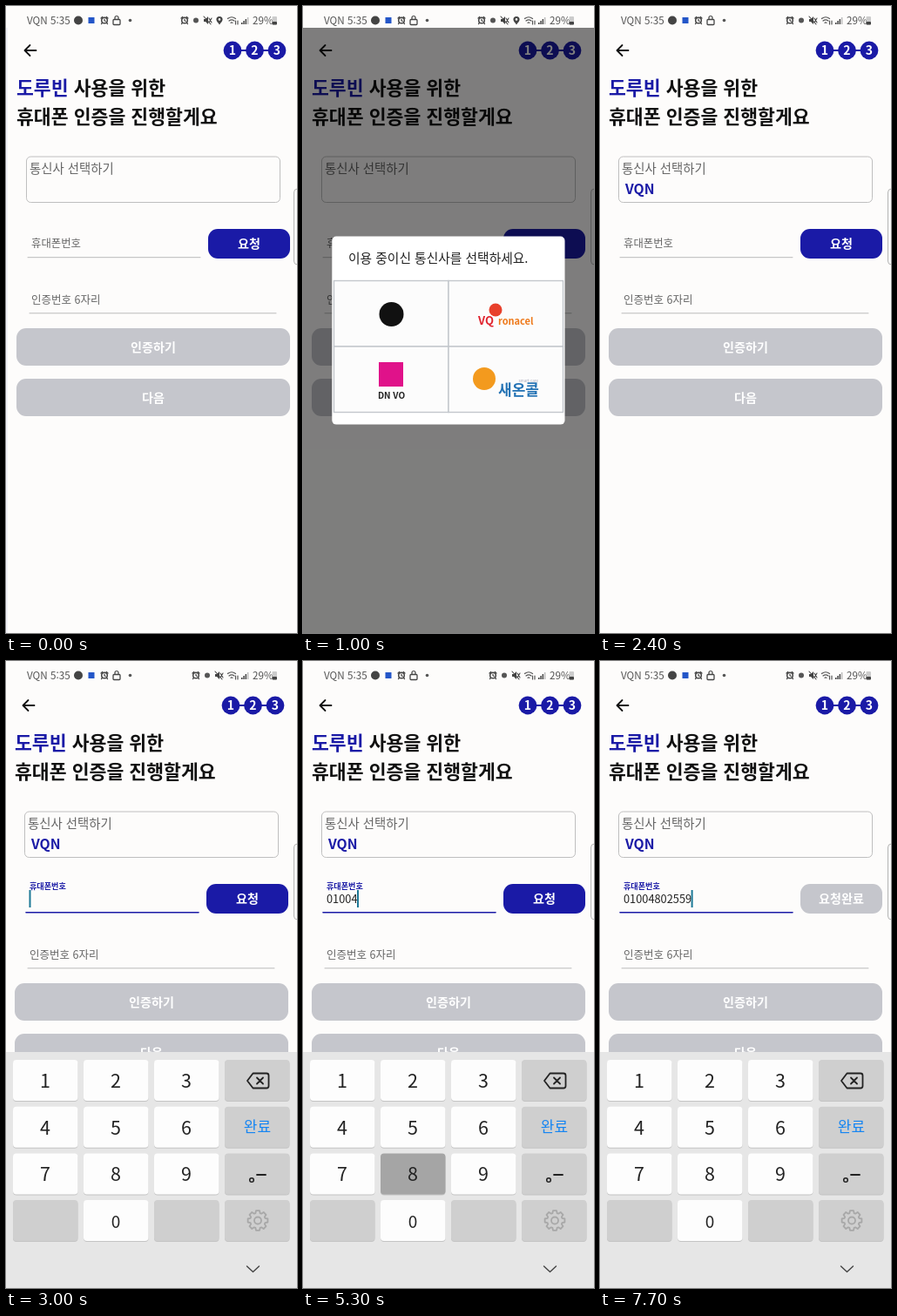
An HTML page that plays this animation: 334 px wide and 720 px high, repeating every 8 s.

```html
<!DOCTYPE html>
<html lang="ko">
<head>
<meta charset="utf-8">
<style>
html, body { margin: 0; width: 100%; height: 100%; overflow: hidden; background: #fdfcfb; }
svg { display: block; font-family: "Noto Sans CJK KR", "Noto Sans CJK", "Noto Sans", sans-serif; }
.bold { font-weight: 700; }
.mid { text-anchor: middle; }
.line { fill: none; stroke-linecap: round; stroke-linejoin: round; }
</style>
</head>
<body>
<svg id="stage" width="334" height="720" viewBox="0 0 334 720"></svg>
<script>
const LOOP = 8000;
const BLUE = '#1a1aa6', GREY = '#c5c6cc', PAPER = '#fdfcfb', INK = '#111';
const CARRIER = 'VQN', NUMBER = '01004802559';
const PRESSES = [3850, 4200, 4500, 4700, 4900, 5300, 5600, 5900, 6200, 6400, 6600];
const DIGIT_DELAY = 100, HOLD = 150, BLINK = 500, FOCUS = 2700, DIGIT_WIDTH = 7.1;

// Markup helpers
const text = (x, y, size, str, fill, cls = '', extra = '') =>
  `<text x="${x}" y="${y}" font-size="${size}" fill="${fill}" class="${cls}" ${extra}>${str}</text>`;
const rect = (x, y, w, h, r, fill, extra = '') =>
  `<rect x="${x}" y="${y}" width="${w}" height="${h}" rx="${r}" fill="${fill}" ${extra}/>`;
const dot = (x, y, r, fill) => `<circle cx="${x}" cy="${y}" r="${r}" fill="${fill}"/>`;
const line = (d, stroke, width = 1, extra = '') =>
  `<path class="line" d="${d}" stroke="${stroke}" stroke-width="${width}" ${extra}/>`;
const button = (x, y, w, h, fill, label, id = '') =>
  `<g id="${id}">${rect(x, y, w, h, 11, fill)}
   ${text(x + w / 2, y + h / 2 + 5, 14.1, label, '#fff', 'bold mid')}</g>`;

const alarm = x => `<g transform="translate(${x} 16.5)">
  <circle r="3.3" fill="none" stroke="#444" stroke-width="1.5"/>
  ${line('M0-1.5V.3L1.2 1M-4-2.5L-2.3-4M4-2.5L2.3-4M-2.6 3L-3.5 4M2.6 3L3.5 4', '#444', 1.2)}</g>`;

function statusBar() {
  return rect(0, 0, 334, 25, 0, PAPER) +
    text(24, 21, 11.7, `${CARRIER} 5:35`, '#555') +
    dot(83, 16.5, 5, '#444') + rect(94.5, 13, 7, 7, 0, '#2456c8') + alarm(113) +
    rect(123, 15.5, 8, 6, 1, 'none', 'stroke="#444" stroke-width="1.3"') +
    line('M125 15V13.5a2 2 0 0 1 4 0V15', '#444', 1.2) + dot(142.5, 16.5, 1.8, '#555') +
    `<g id="movers">${alarm(205)}${dot(218, 16.5, 3, '#555')}
      <path d="M227 15h2l3-3v9l-3-3h-2z" fill="#444"/>
      ${line('M233 14l3 5M236 14l-3 5M227 12l8 9', '#444', 1.1)}</g>
     <path id="pin" d="M245 21.5c-2-3-3.6-4-3.6-6a3.6 3.6 0 0 1 7.2 0c0 2-1.6 3-3.6 6zm0-4.8a1.3 1.3 0 1 0 0-2.6 1.3 1.3 0 0 0 0 2.6z" fill="#444"/>` +
    line('M254.5 14.5q4.5-3.5 9 0M256 17q3-2.4 6 0M258 19.3q1-1 2 0M263.5 21v-4M266 17v4', '#555', 1.2) +
    [2, 4, 6, 8].map((h, i) => rect(270 + i * 2.3, 21 - h, 1.5, h, 0, i < 3 ? '#444' : '#bbb')).join('') +
    text(283, 21, 11.7, '29%', '#555') +
    rect(305.5, 12, 5.5, 9.5, 1, '#ccc') + rect(305.5, 18, 5.5, 3.5, 1, '#444');
}

function page() {
  const steps = [258, 283.5, 309].map((x, i) =>
    dot(x, 51, 10.4, BLUE) + text(x, 56, 14, i + 1, '#fff', 'bold mid')).join('');
  return rect(0, 25, 336, 695, 0, PAPER) +
    line('M32.5 51H20M25.5 45L19.5 51L25.5 57', INK, 1.8) +
    line('M258 51H309', BLUE, 2) + steps +
    text(10, 101.6, 21.6, `<tspan fill="${BLUE}">도루빈</tspan> 사용을 위한`, INK, 'bold') +
    text(10, 134.6, 21.6, '휴대폰 인증을 진행할게요', INK, 'bold') +
    rect(21.5, 173, 291, 52.5, 5, 'none', 'stroke="#bfbfbf"') +
    text(25, 191.5, 14.4, '통신사 선택하기', '#666') +
    text(29, 216, 15.8, CARRIER, BLUE, 'bold', 'id="chosen"') +
    text(0, 0, 12.4, '휴대폰번호', '#666', '', 'id="label"') +
    text(27, 277.5, 12.8, '', '#222', '', 'id="typed"') +
    line('M23 288.7H221', '#bbb', 1, 'id="rule"') +
    rect(0, 263, 2, 20, 0, '#1c7896', 'id="cursor"') +
    button(230, 256, 94, 34, BLUE, '요청', 'request') +
    text(27, 341.8, 12.5, '인증번호 6자리', '#666') + line('M25 352.8H308', '#bbb') +
    button(10, 370, 314, 43, GREY, '인증하기') + button(10, 428, 314, 43, GREY, '다음');
}

function dialog() {
  const cell = (x, y, content, id = '') =>
    `<g id="${id}">${rect(x, y, 131.5, 75.5, 0, '#fcfcfc', 'stroke="#c3c7cc" stroke-width="1.4"')}${content}</g>`;
  return rect(0, 25, 334, 695, 0, 'rgba(0,0,0,.5)') +
    rect(33.3, 264.6, 267.2, 216, 5, '#fff') +
    text(52, 295, 14.75, '이용 중이신 통신사를 선택하세요.', '#222') +
    cell(35.5, 315.5, dot(101.5, 354, 14, INK)) +
    cell(167, 315.5, dot(221, 349, 7.5, '#e8402c') +
      text(201, 365.5, 13, 'VQ', '#e0232e', 'bold') +
      text(224, 365.5, 11, 'ronacel', '#ee7a1c', 'bold'), 'pick') +
    cell(35.5, 391, rect(87, 409, 28, 28, 0, '#e0128a') +
      text(101.5, 450.5, 10, 'DN VO', '#222', 'bold mid')) +
    cell(167, 391, dot(208, 428, 13, '#f39a1e') +
      text(270, 432, 4.5, 'smart care', '#aab', '', 'text-anchor="end"') +
      text(224, 447, 17, '새온콜', '#2372b4', 'bold'));
}

function cog(cx, cy) {
  const points = [];
  for (let tooth = 0; tooth < 8; tooth++)
    for (const [turn, r] of [[-.3, 8.8], [-.17, 11.6], [.17, 11.6], [.3, 8.8]]) {
      const a = tooth * Math.PI / 4 + turn;
      points.push(`${(cx + r * Math.sin(a)).toFixed(1)} ${(cy - r * Math.cos(a)).toFixed(1)}`);
    }
  return line(`M${points.join('L')}Z`, '#a8a8a8', 1.8) +
    `<circle cx="${cx}" cy="${cy}" r="4" fill="none" stroke="#a8a8a8" stroke-width="1.8"/>`;
}

function keyboard() {
  const labels = ['1', '2', '3', '', '4', '5', '6', '', '7', '8', '9', '', '', '0', '', ''];
  const keys = labels.map((label, i) => {
    const x = 8 + (i % 4) * 81, y = 458 + Math.floor(i / 4) * 53.7;
    return rect(x, y + 1, 74.5, 47, 4, '#c4c4c4') +
      rect(x, y, 74.5, 47, 4, label ? '#fdfdfd' : '#cfcfcf', label && `id="key${label}"`) +
      text(x + 37, y + 32, label === '0' ? 19 : 21.5, label, '#222', 'mid');
  }).join('');
  return rect(0, 449, 334, 271, 0, '#e6e6e6') + keys +
    line('M277 482L283.5 473.5H299Q301.5 473.5 301.5 476V488Q301.5 490.5 299 490.5H283.5ZM288 478.5L295 485.5M295 478.5L288 485.5', '#222', 1.8) +
    text(288.5, 541, 17, '완료', '#1585f2', 'mid') +
    `<circle cx="282" cy="596" r="2.3" fill="none" stroke="#222" stroke-width="1.5"/>` +
    line('M288 590H298', '#222', 1.8) + cog(289, 642.5) +
    line('M276.5 695L283.5 701.5L290.5 695', '#444', 1.4);
}

stage.innerHTML = rect(0, 0, 334, 720, 0, '#f1f1f7') +
  `<g id="screen">${page()}</g>` +
  rect(330.5, 210, 12, 87, 4, '#f8f8f8', 'stroke="#b5b5b5"') +
  `<g id="modal">${dialog()}</g><g id="pad">${keyboard()}</g>` + statusBar();

const el = id => document.getElementById(id);
const [screenG, modal, pad, pick, chosen, label, typed, rule, cursor, request, movers, pin] =
  ['screen', 'modal', 'pad', 'pick', 'chosen', 'label', 'typed', 'rule', 'cursor', 'request', 'movers', 'pin'].map(el);
const [requestBox, requestText] = request.children;

const easeOut = p => 1 - (1 - p) ** 2;
const easeInOut = p => p * p * (3 - 2 * p);

// Motion tables: [time, value] pairs with one easing per track
const TRACKS = {
  slide: { ease: easeOut, steps: [[0, 2], [500, 0]] },
  modal: { ease: easeInOut, steps: [[680, 0], [980, 1], [2110, 1], [2400, 0]] },
  pick: { ease: easeInOut, steps: [[1860, 1], [2010, .2], [2170, .2], [2420, 1]] },
  float: { ease: easeInOut, steps: [[2560, 0], [2730, 1]] },
  pad: { ease: easeOut, steps: [[2650, 271], [3000, 0]] },
  request: { ease: easeInOut, steps: [[6950, 1], [7100, .2], [7150, .2], [7300, 1]] }
};

function at(name, t) {
  const { ease, steps } = TRACKS[name];
  const next = steps.findIndex(([time]) => time > t);
  if (next === 0) return steps[0][1];
  if (next < 0) return steps[steps.length - 1][1];
  const [t0, a] = steps[next - 1], [t1, b] = steps[next];
  return a + (b - a) * ease((t - t0) / (t1 - t0));
}

const show = (node, on) => node.setAttribute('visibility', on ? 'visible' : 'hidden');

function render(t) {
  screenG.setAttribute('transform', `translate(${at('slide', t)} 0)`);
  modal.setAttribute('opacity', at('modal', t));
  pick.setAttribute('opacity', at('pick', t));
  show(chosen, t >= 2100);

  show(pin, t < 1400);
  movers.setAttribute('transform', `translate(${t < 1400 ? 0 : 13} 0)`);

  const up = at('float', t), focused = up > 0;
  label.setAttribute('transform', `translate(27 ${277 - 15.5 * up}) scale(${1 - .266 * up})`);
  label.setAttribute('fill', focused ? BLUE : '#666');
  label.setAttribute('font-weight', focused ? 600 : 400);
  rule.setAttribute('stroke', focused ? BLUE : '#bbb');
  rule.setAttribute('stroke-width', focused ? 1.6 : 1);
  pad.setAttribute('transform', `translate(0 ${at('pad', t)})`);

  const count = PRESSES.filter(p => t >= p + DIGIT_DELAY).length;
  typed.textContent = NUMBER.slice(0, count);
  const lastInput = count ? PRESSES[count - 1] + DIGIT_DELAY : FOCUS;
  cursor.setAttribute('x', 26.5 + count * DIGIT_WIDTH);
  show(cursor, t >= FOCUS && (t - lastInput) % (2 * BLINK) < BLINK);

  const active = PRESSES.findLastIndex(p => t >= p && t < p + HOLD);
  for (let d = 0; d < 10; d++)
    el('key' + d).setAttribute('fill', NUMBER[active] === String(d) ? '#a5a5a5' : '#fdfdfd');

  const sent = t >= 7150;
  request.setAttribute('opacity', at('request', t));
  requestBox.setAttribute('fill', sent ? GREY : BLUE);
  requestText.textContent = sent ? '요청완료' : '요청';
}

const start = performance.now();
function tick() {
  render((performance.now() - start) % LOOP);
  requestAnimationFrame(tick);
}
tick();
</script>
</body>
</html>
```
